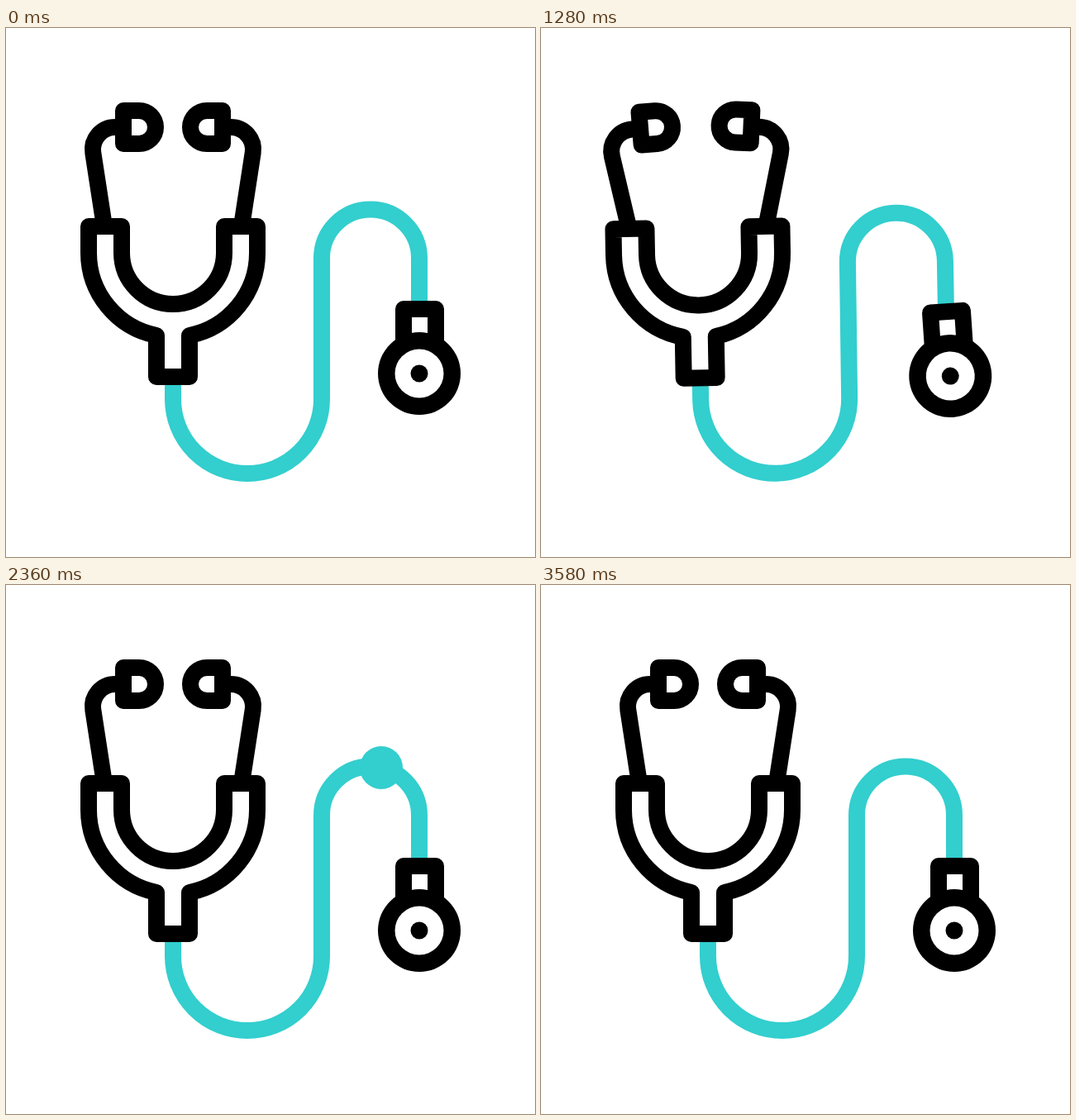
Write an HTML page with a canvas that moves like this. It is 640 px wide and 640 px high and loops after 3.6 s.

```html
<!DOCTYPE html>
<html lang="en">
<head>
<meta charset="utf-8">
<title>Stethoscope</title>
<style>
  html, body { margin: 0; width: 100%; height: 100%; overflow: hidden; background: #fff; }
  canvas { display: block; }
</style>
</head>
<body>
<canvas id="stage" width="640" height="640"></canvas>
<script>
const ctx = document.getElementById('stage').getContext('2d');
const LOOP = 3600, TEAL = '#33cece';

const yoke = new Path2D('M100 240H140V272A62 62 0 0 0 264 272V240H304V272' +
  'A102 102 0 0 1 222 372V422H182V372A102 102 0 0 1 100 272Z');
const earTube = new Path2D('M119 240L105.3 151A27 27 0 0 1 132 120H140');
const earTip = new Path2D('M142 100H161A20 20 0 0 1 161 140H142Z');
const headNeck = new Path2D('M481 385V340H520V385Z');

// Offsets from rest at the top and bottom of the swing
const up = { x: -24.5, y: -37.3, turn: -6.1, loopX: -27, loopY: -100, loopTurn: -20 };
const down = { x: 1.5, y: 34, turn: 3.8, loopX: 4, loopY: 103, loopTurn: 17 };

// Smooth step from 0 to 1; a higher power gives a slower start
function ramp(t, from, to, power = 1) {
  const x = Math.min(1, Math.max(0, (t - from) / (to - from))) ** power;
  return x * x * (3 - 2 * x);
}

function poseAt(t) {
  const rise = ramp(t, 480, 720);
  const fall = ramp(t, 800, 1480, 1.95);
  const back = ramp(t, 1480, 1680);
  const pose = {};
  for (const key in up) pose[key] = up[key] * rise * (1 - fall) + down[key] * fall * (1 - back);
  pose.spread = 14.7 * rise - 18.4 * ramp(t, 800, 1440, 1.95) + 3.7 * back
    + 13 * (ramp(t, 2960, 3200) - ramp(t, 3200, 3540));
  pose.head = -33 * rise + 60 * ramp(t, 800, 1500, 1.9)
    - 34 * ramp(t, 1500, 1880) + 7 * ramp(t, 1880, 2240);
  return pose;
}

const placed = (cx, cy, dx, dy, angle) => new DOMMatrix()
  .translate(cx + dx, cy + dy).rotate(angle).translate(-cx, -cy);

// Point on the resting tube, measured from the chest piece
function tubePoint(s) {
  const leg = 81.5, bend = Math.PI * 59, drop = 170.5, bowl = Math.PI * 90;
  if (s < leg) return [500, 360 - s];
  s -= leg;
  if (s < bend) return [441 + 59 * Math.cos(s / 59), 278.5 - 59 * Math.sin(s / 59)];
  s -= bend;
  if (s < drop) return [382, 278.5 + s];
  s -= drop;
  if (s < bowl) return [292 + 90 * Math.cos(s / 90), 449 + 90 * Math.sin(s / 90)];
  return [202, 449 - (s - bowl)];
}

function outline(path) {
  ctx.fillStyle = '#fff';
  ctx.fill(path);
  ctx.stroke(path);
}

function disc(x, y, r, color) {
  ctx.fillStyle = color;
  ctx.beginPath();
  ctx.arc(x, y, r, 0, 2 * Math.PI);
  ctx.fill();
}

function drawEar(body, mirrored, spread) {
  ctx.setTransform(body);
  if (mirrored) ctx.transform(-1, 0, 0, 1, 404, 0);
  ctx.translate(122, 238);
  ctx.rotate(-spread * Math.PI / 180);
  ctx.translate(-122, -238);
  ctx.stroke(earTube);
  outline(earTip);
}

function draw(t) {
  const pose = poseAt(t);
  const body = placed(320, 320, pose.x, pose.y, pose.turn);
  const loop = placed(441, 278.5, pose.loopX, pose.loopY, pose.loopTurn);

  ctx.resetTransform();
  ctx.fillStyle = '#fff';
  ctx.fillRect(0, 0, 640, 640);
  ctx.lineWidth = 20;
  ctx.lineJoin = 'round';

  // The tube bridges the body and the loop, each with its own transform
  ctx.strokeStyle = TEAL;
  ctx.beginPath();
  ctx.setTransform(body);
  ctx.moveTo(202, 425);
  ctx.arc(292, 449, 90, Math.PI, 0, true);
  ctx.setTransform(loop);
  ctx.arc(441, 278.5, 59, Math.PI, 0);
  ctx.lineTo(500, 343);
  ctx.resetTransform();
  ctx.stroke();

  if (t > 2080 && t < 3030) disc(...tubePoint(764.5 * ramp(t, 2080, 3030)), 26, TEAL);

  ctx.strokeStyle = '#000';
  drawEar(body, false, pose.spread);
  drawEar(body, true, pose.spread);
  ctx.setTransform(body);
  outline(yoke);

  const joint = loop.transformPoint({ x: 500, y: 340 });
  ctx.setTransform(placed(500, 340, joint.x - 500, joint.y - 340, pose.head));
  outline(headNeck);
  disc(500, 418, 50, '#000');
  disc(500, 418, 29.5, '#fff');
  disc(500, 418, 10.5, '#000');
}

function tick() {
  draw(performance.now() % LOOP);
  requestAnimationFrame(tick);
}
tick();
</script>
</body>
</html>
```
